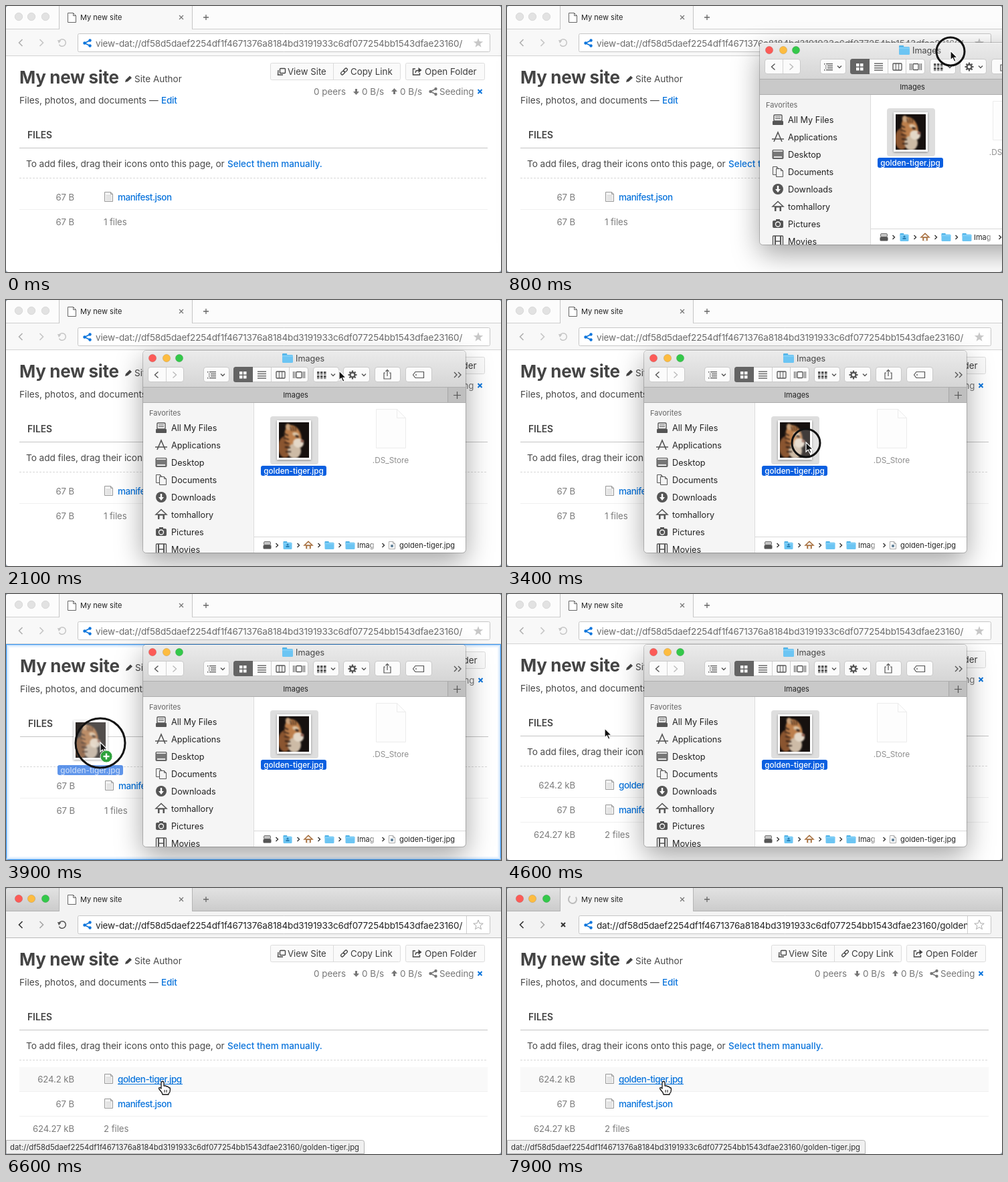
Write an HTML page with a canvas that moves like this. It is 740 by 398 pixels and loops after 8000 ms.

```html
<!DOCTYPE html>
<html lang="en">
<head>
<meta charset="utf-8">
<title>Adding a file to a site</title>
<style>
html, body { margin: 0; width: 740px; height: 398px; overflow: hidden; background: #fff; }
canvas { display: block; width: 740px; height: 398px; }
</style>
</head>
<body>
<canvas id="stage" width="740" height="398"></canvas>
<script>
const c = document.getElementById('stage').getContext('2d');
const LOOP = 8000, STEP = 100;
const HASH = 'df58d5daef2254df1f4671376a8184bd3191933c6df077254bb1543dfae23160';
const PHOTO = 'golden-tiger.jpg';
const BLUE = '#0a74dc', INK = '#484848';

// [time, x, y]
const windowPath = [[0, 778, 54], [200, 705, 54], [400, 605, 54], [600, 492, 54], [800, 378, 55],
  [900, 322, 64], [1000, 273, 70], [1200, 211, 76], [1500, 205, 76]];
const cursorPath = [[0, 1063, 67], [400, 890, 67], [800, 663, 67], [900, 614, 76], [1000, 570, 82],
  [1200, 515, 88], [1500, 509, 88], [1900, 508, 89], [2300, 488, 122], [2800, 452, 202], [3000, 447, 213],
  [3400, 447, 213], [3600, 248, 224], [3700, 185, 225], [3800, 148, 223], [3900, 141, 222],
  [4300, 141, 222], [4900, 150, 180], [5500, 150, 180], [6300, 222, 269], [6500, 234, 291]];
// [pressed, released]
const presses = [[0, 1600], [3300, 3800], [5100, 5300], [7300, 7400]];

function at(keys, t) {
  let i = 0;
  while (i < keys.length - 1 && keys[i + 1][0] <= t) i++;
  const a = keys[i], b = keys[i + 1];
  if (!b) return [a[1], a[2]];
  const p = (t - a[0]) / (b[0] - a[0]);
  return [Math.round(a[1] + (b[1] - a[1]) * p), Math.round(a[2] + (b[2] - a[2]) * p)];
}

function text(s, x, y, size, color, o = {}) {
  c.font = `${o.w || 400} ${size}px Inter, sans-serif`;
  c.letterSpacing = (o.ls || 0) + 'px';
  c.textAlign = o.align || 'left';
  c.fillStyle = color;
  c.fillText(s, x, y);
}

function rect(x, y, w, h, color) { c.fillStyle = color; c.fillRect(x, y, w, h); }

function box(x, y, w, h, r, fill, stroke, lw = 1) {
  c.beginPath();
  c.roundRect(x, y, w, h, r);
  paint(fill, stroke, lw);
}

function paint(fill, stroke, lw = 1) {
  if (fill) { c.fillStyle = fill; c.fill(); }
  if (stroke) { c.strokeStyle = stroke; c.lineWidth = lw; c.stroke(); }
}

function disc(x, y, r, fill, stroke, lw) {
  c.beginPath();
  c.arc(x, y, r, 0, Math.PI * 2);
  paint(fill, stroke, lw);
}

function oval(x, y, rx, ry, fill, turn = 0) {
  c.beginPath();
  c.ellipse(x, y, rx, ry, turn, 0, Math.PI * 2);
  paint(fill);
}

// points are a flat list: x, y, x, y, ...
function trace(p) {
  c.beginPath();
  for (let i = 0; i < p.length; i += 2) c.lineTo(p[i], p[i + 1]);
}
function line(p, color, lw = 1) { trace(p); paint(null, color, lw); }
function poly(p, fill, stroke, lw) { trace(p); c.closePath(); paint(fill, stroke, lw); }

function shift(x, y, draw) {
  c.save();
  c.translate(x, y);
  draw();
  c.restore();
}

function fade(y0, y1, a, b) {
  const g = c.createLinearGradient(0, y0, 0, y1);
  g.addColorStop(0, a);
  g.addColorStop(1, b);
  return g;
}

function chevron(x, y, w, h, color, lw) { line([x - w, y - h, x + w, y, x - w, y + h], color, lw); }
function drop(x, y, color) { line([x - 3, y - 1.5, x, y + 1.5, x + 3, y - 1.5], color, 1.4); }

function share(x, y, color) {
  line([x + 4, y - 4, x - 4, y, x + 4, y + 4], color, 1.6);
  disc(x + 4, y - 4, 2.2, color);
  disc(x - 4, y, 2.2, color);
  disc(x + 4, y + 4, 2.2, color);
}

function arrow(x, y, dir, color) {
  line([x, y - 4 * dir, x, y + 1 * dir], color, 3);
  poly([x - 4.5, y, x + 4.5, y, x, y + 5 * dir], color);
}

function star(x, y, r, fill, stroke) {
  const p = [];
  for (let i = 0; i < 10; i++) {
    const a = -Math.PI / 2 + i * Math.PI / 5, q = i % 2 ? r * 0.42 : r;
    p.push(x + Math.cos(a) * q, y + Math.sin(a) * q);
  }
  poly(p, fill, stroke, 1);
}

function sheet(x, y, w, h, fold, fill, stroke) {
  poly([x, y, x + w - fold, y, x + w, y + fold, x + w, y + h, x, y + h], fill, stroke);
  line([x + w - fold, y, x + w - fold, y + fold, x + w, y + fold], stroke);
}

function folder(x, y, w, h) {
  box(x, y, w * 0.45, h * 0.4, 1, '#4fb2e6');
  box(x, y + h * 0.14, w, h * 0.86, 1.5, '#6cc5f3');
  rect(x, y + h * 0.26, w, 1, '#8fd6fa');
}

function house(x, y, color, s = 1) {
  poly([x - 8 * s, y, x, y - 7.5 * s, x + 8 * s, y], null, color, 1.5);
  rect(x - 5 * s, y, 10 * s, 7 * s, color);
  rect(x - 2.5 * s, y + 1.5 * s, 5 * s, 5.5 * s, '#f5f5f5');
}

function lights(xs, y, on) {
  ['#fc5b57', '#fdbc40', '#34c84a'].forEach((col, i) =>
    disc(xs[i], y, 5.7, on ? col : '#e2e2e2', on ? 'rgba(0,0,0,.14)' : '#d3d3d3', 0.8));
}

function drawChrome(t, active, loading) {
  const ink = active ? '#333' : '#b0b0b0', pale = active ? '#a5a5a5' : '#c6c6c6';
  const bar = active ? '#f3f3f3' : '#f8f8f8';
  rect(0, 0, 740, 35, active ? fade(0, 35, '#e2e2e2', '#cbcbcb') : '#fcfcfc');
  rect(0, 34, 740, 1, active ? '#b0b0b0' : '#cfcfcf');
  rect(0, 35, 740, 39, bar);
  rect(79, 0, 200, 35, bar);
  line([79.5, 0, 79.5, 35], active ? '#b4b4b4' : '#c6c6c6');
  line([278.5, 0, 278.5, 35], active ? '#b4b4b4' : '#c6c6c6');
  rect(0, 74, 740, 1, active ? '#b9b9b9' : '#d4d4d4');
  lights([19, 38, 59], 16, active);

  if (loading) {
    const a = t / 1000 * Math.PI * 2;
    c.beginPath();
    c.arc(98, 17, 6, a, a + Math.PI * 1.5);
    paint(null, '#bdbdbd', 2);
  } else sheet(92.5, 10.5, 12, 14, 4, '#fff', '#666');
  text('My new site', 111, 21, 11, '#222');
  line([259, 14, 265, 20], '#777', 1.2);
  line([265, 14, 259, 20], '#777', 1.2);
  line([295, 17, 303, 17], '#666', 1.3);
  line([299, 13, 299, 21], '#666', 1.3);

  chevron(22, 55, -2.5, 5, ink, 1.6);
  chevron(53, 55, 2.5, 5, pale, 1.6);
  if (loading) {
    line([81, 52, 87, 58], ink, 2);
    line([87, 52, 81, 58], ink, 2);
  } else {
    const col = active ? '#555' : pale;
    c.beginPath();
    c.arc(84, 55, 5.3, -2.6, 2.6);
    paint(null, col, 1.5);
    poly([77, 51, 82.5, 51.5, 79, 56], col);
  }

  box(107.5, 41.5, 616, 27, 2, '#fff', '#c6c6c6');
  share(121.5, 55.5, BLUE);
  c.save();
  c.beginPath();
  c.rect(108, 42, 580, 26);
  c.clip();
  const url = loading ? `dat://${HASH}/${PHOTO}` : `view-dat://${HASH}/`;
  text(url, 134, 60.5, 13.5, active ? '#222' : '#6c6c6c', { ls: -0.15 });
  c.restore();
  if (active) line([688.5, 42, 688.5, 68], '#cfcfcf');
  star(706, 55.5, 7.6, active ? '#fff' : '#c8c8c8', active ? '#aaa' : null);
}

function button(x, w) { box(x + 0.5, 85.5, w, 25, 2, '#fafafa', '#dcdcdc'); }

function drawRow(y, size, name) {
  text(size, 102, y + 5, 13.2, '#7c7c7c', { align: 'right', ls: -0.1 });
  if (!name) return;
  sheet(147.5, y - 7.5, 12, 14, 3, '#f3f3f3', '#999');
  for (let i = 0; i < 4; i++) line([149.5, y - 2.5 + i * 2.2, 157.5, y - 2.5 + i * 2.2], '#c9c9c9', 0.8);
  text(name, 167, y + 5, 13.5, BLUE, { w: 500, ls: -0.48 });
}

function drawPage(added, over, hover, link) {
  const grey = '#777';
  text('My new site', 20, 116, 26, '#444', { w: 700, ls: -0.33 });
  poly([178, 114, 179, 110.5, 185, 104.5, 188, 107.5, 182, 113], '#444');
  text('Site Author', 192, 114, 13.5, INK);
  text('Files, photos, and documents —', 20, 146, 13.7, INK);
  text('Edit', 232, 146, 13.5, BLUE, { w: 500, ls: -0.2 });

  button(395, 194);
  line([489.5, 86, 489.5, 110], '#dcdcdc');
  button(597, 118);
  box(409.5, 93.5, 8, 7, 1, null, '#444', 1.4);
  line([407, 96, 406.5, 103, 414, 103], '#444', 1.4);
  text('View Site', 421, 103, 13.2, '#3c3c3c');
  c.save();
  c.translate(505.5, 98);
  c.rotate(-Math.PI / 4);
  box(-6, -2, 6.5, 4, 2, null, '#444', 1.3);
  box(-0.5, -2, 6.5, 4, 2, null, '#444', 1.3);
  c.restore();
  text('Copy Link', 515, 103, 13.3, '#3c3c3c');
  line([612, 94, 608.5, 94, 608.5, 103, 618.5, 103, 618.5, 100], '#444', 1.4);
  line([612, 100, 613, 97, 618, 96], '#444', 1.5);
  poly([616.5, 92, 621.5, 96, 616.5, 100], '#444');
  text('Open Folder', 626, 103, 13.4, '#3c3c3c');

  text('0 peers', 460, 133, 13.4, grey);
  arrow(523.5, 128, 1, grey);
  text('0 B/s', 532, 133, 13.5, grey);
  arrow(580.5, 128, -1, grey);
  text('0 B/s', 589, 133, 13.5, grey);
  share(638.5, 128, grey);
  text('Seeding', 648, 133, 13.3, grey);
  line([705.5, 125, 711.5, 131], BLUE, 2);
  line([711.5, 125, 705.5, 131], BLUE, 2);

  text('FILES', 32, 198, 13.8, '#444', { w: 600 });
  rect(20, 212, 700, 1, '#c4c4c4');
  if (!over) {
    text('To add files, drag their icons onto this page, or', 30, 241, 13.7, INK, { ls: -0.09 });
    text('Select them manually.', 331, 241, 13.5, BLUE, { w: 500 });
  }
  c.setLineDash([3, 2]);
  line([20, 257.5, 720, 257.5], '#d8d8d8');
  c.setLineDash([]);

  if (hover) rect(20, 268, 700, 36, '#f9f9f9');
  const files = added ? [['624.2 kB', PHOTO], ['67 B', 'manifest.json']] : [['67 B', 'manifest.json']];
  files.forEach(([size, name], i) => {
    drawRow(286 + i * 37, size, name);
    rect(20, 304 + i * 37, 700, 1, '#f0f0f0');
  });
  if (link) rect(167, 293, 97, 1, BLUE);
  const y = 286 + files.length * 37;
  drawRow(y, added ? '624.27 kB' : '67 B');
  text(files.length + ' files', 146, y + 5, 13.2, '#7c7c7c', { ls: -0.05 });
}

function drawDropBorder() {
  for (let i = 1; i < 5; i++) {
    c.strokeStyle = `rgba(30,135,240,${0.3 / i})`;
    c.lineWidth = 1;
    c.strokeRect(i + 0.5, 75.5 + i, 739 - i * 2, 322 - i * 2);
  }
  c.strokeStyle = '#3a97f2';
  c.strokeRect(0.5, 75.5, 739, 322);
}

function drawPhoto(x, y) {
  c.save();
  c.translate(x, y);
  c.shadowColor = 'rgba(0,0,0,.4)';
  c.shadowBlur = 3;
  c.shadowOffsetY = 1;
  rect(0, 0, 51, 59, '#fff');
  c.shadowColor = 'transparent';
  c.beginPath();
  c.rect(3, 3, 45, 53);
  c.clip();
  rect(3, 3, 45, 53, '#17110f');
  c.filter = 'blur(1.2px)';
  oval(12, 40, 10, 16, '#8a5530');
  oval(24, 24, 12, 17, '#bd7f4c', -0.3);
  oval(17, 10, 4, 5, '#c9a27c', -0.4);
  oval(26, 46, 10, 11, '#cdbba6');
  oval(32, 34, 8, 7, '#e4d8c8', 0.3);
  oval(28, 21, 5, 3, '#dcc4a6', 0.3);
  oval(30, 24, 3, 1.5, '#2a1a12', 0.3);
  oval(38, 31, 2.5, 2, '#8a5546');
  for (let i = 0; i < 5; i++) line([9 + i, 19 + i * 7, 17 + i, 23 + i * 6], '#2a1a12', 1.8);
  for (let i = 0; i < 3; i++) line([20 + i * 4, 9, 22 + i * 3, 16], '#3a2416', 1.4);
  c.restore();
}

function drawLabel(x, y) {
  box(x, y, 98, 15, 3, '#0b5fe0');
  text(PHOTO, x + 49, y + 12, 11.7, '#fff', { align: 'center', w: 500 });
}

const sideIcons = [
  () => { box(-6, -7, 12, 9, 1, null, '#555', 1.4); line([-4, -4, 4, -4], '#555'); line([-4, -1.5, 4, -1.5], '#555'); box(-8, 2, 16, 6, 1, '#555'); },
  () => { line([-6, 7, 0, -7, 6, 7], '#555', 1.6); line([-9, 3, 9, 3], '#555', 1.5); },
  () => { box(-8, -6.5, 16, 13, 1, '#777', '#555'); rect(-7, -6, 14, 2, '#ddd'); rect(-6, 3, 12, 2, '#e5e5e5'); },
  () => { sheet(-7.5, -7.5, 9, 12, 3, '#f5f5f5', '#555'); sheet(-2.5, -4.5, 10, 12, 3, '#f5f5f5', '#555'); },
  () => { disc(0, 0, 8, '#555'); line([0, -5, 0, 1], '#fff', 2.5); poly([-4, 0, 4, 0, 0, 5], '#fff'); },
  () => house(0, 0, '#555'),
  () => { box(-8, -5, 16, 11, 2, '#555'); rect(-3, -7, 6, 3, '#555'); disc(0, 0.5, 3.5, '#555', '#fff', 1.3); },
  () => { box(-7.5, -8, 15, 16, 1, null, '#555', 1.4); rect(-5, -8, 2, 16, '#555'); rect(3, -8, 2, 16, '#555'); line([-4, 0, 4, 0], '#555', 1.5); }
];
const sideNames = ['All My Files', 'Applications', 'Desktop', 'Documents', 'Downloads', 'tomhallory', 'Pictures', 'Movies'];

function tool(x, w) { box(x + 0.5, 24.5, w, 22, 3.5, '#fbfbfb', '#c9c9c9'); }

function drawToolbar() {
  const ink = '#555';
  tool(7, 53);
  line([34.5, 25, 34.5, 46], '#d2d2d2');
  chevron(20, 36, -2.5, 4.5, ink, 1.4);
  chevron(47, 36, 2.5, 4.5, '#bbb', 1.4);

  tool(90, 38);
  for (let i = 0; i < 4; i++) {
    const inset = i % 3 ? 2 : 0;
    rect(96 + inset, 31 + i * 3, 1.5, 1.5, ink);
    rect(99 + inset, 31 + i * 3, 10 - inset, 1.3, ink);
  }
  drop(119, 36, ink);

  tool(135, 111);
  box(135, 24, 29, 23, [3.5, 0, 0, 3.5], '#646464');
  for (let i = 0; i < 4; i++) rect(144 + (i % 2) * 6, 31 + (i >> 1) * 6, 4.5, 4.5, '#fff');
  for (let i = 0; i < 4; i++) rect(171, 30.5 + i * 3.3, 13, 1.3, ink);
  box(199, 31, 13, 10, 1, null, ink, 1.3);
  line([203.3, 31, 203.3, 41], ink);
  line([207.7, 31, 207.7, 41], ink);
  box(229, 31.5, 8, 9, 1, null, ink, 1.3);
  [224.5, 226.8, 239.3, 241.6].forEach(x => line([x, 31, x, 41], ink));
  [191.5, 218.5].forEach(x => line([x, 25, x, 46], '#d0d0d0'));

  tool(254, 38);
  for (let i = 0; i < 6; i++) {
    rect(260 + (i % 3) * 5, 31 + (i / 3 | 0) * 6, 3.5, 3.5, ink);
    rect(260 + (i % 3) * 5, 35.3 + (i / 3 | 0) * 6, 3.5, 0.8, ink);
  }
  drop(284, 36, ink);

  tool(299, 39);
  for (let i = 0; i < 8; i++) {
    const a = i * Math.PI / 4, x = Math.cos(a), y = Math.sin(a);
    line([313 + x * 3, 36 + y * 3, 313 + x * 6.5, 36 + y * 6.5], ink, 2.2);
  }
  disc(313, 36, 3.5, '#fbfbfb', ink, 2.4);
  drop(330, 36, ink);

  tool(346, 38);
  line([362, 33, 360, 33, 360, 42, 370, 42, 370, 33, 368, 33], ink, 1.2);
  line([365, 38, 365, 28.5], ink, 1.2);
  line([362.5, 31, 365, 28.5, 367.5, 31], ink, 1.2);

  tool(392, 39);
  poly([403.5, 36, 407, 31.5, 419.5, 31.5, 419.5, 40.5, 407, 40.5], null, ink, 1.2);
  disc(408, 36, 0.9, ink);
  chevron(467, 36, 2, 4, ink, 1.4);
  chevron(473, 36, 2, 4, ink, 1.4);
}

function drawPathBar() {
  rect(166, 278, 316, 1, '#d9d9d9');
  box(180.5, 285.5, 10, 5, 1.5, '#c4c4c4', '#777');
  box(179.5, 290.5, 12, 6, 1.5, '#555');
  [200, 232, 263, 294, 359].forEach(x => chevron(x, 291, 1.5, 3, '#333', 1.4));
  folder(209.5, 285, 13, 12);
  disc(216, 290, 1.6, '#2a80b5');
  rect(213.5, 292, 5, 2, '#2a80b5');
  house(247, 291, '#a8703f', 0.75);
  folder(271.5, 285, 14, 12);
  folder(302.5, 285, 14, 12);
  const g = c.createLinearGradient(336, 0, 348, 0);
  g.addColorStop(0, '#222');
  g.addColorStop(1, '#ccc');
  text('Imag', 320, 295, 11, g);
  sheet(367.5, 285.5, 9, 11, 3, '#fff', '#aaa');
  rect(370, 290, 4, 4, '#6d8aa0');
  text(PHOTO, 383, 295, 11, '#222');
}

function drawFiles() {
  c.save();
  c.shadowColor = 'rgba(0,0,0,.36)';
  c.shadowBlur = 40;
  c.shadowOffsetY = 14;
  box(0, 0, 482, 302, 5, '#fff');
  c.restore();
  box(-0.5, -0.5, 483, 303, 5, null, 'rgba(0,0,0,.2)');
  c.save();
  c.beginPath();
  c.roundRect(0, 0, 482, 302, 5);
  c.clip();

  rect(0, 0, 482, 55, fade(0, 55, '#ebebeb', '#d5d5d5'));
  rect(0, 0, 482, 1, '#f6f6f6');
  lights([14, 35, 54], 11, true);
  folder(208, 4, 16, 14);
  text('Images', 228, 16, 12.6, '#444');
  drawToolbar();
  rect(0, 54, 482, 24, '#c9c9c9');
  rect(0, 54, 482, 1, '#adadad');
  rect(0, 77, 482, 1, '#adadad');
  rect(455, 55, 1, 22, '#a8a8a8');
  rect(456, 55, 26, 22, '#bfbfbf');
  text('Images', 228, 70, 11, '#222', { align: 'center' });
  line([464, 66.5, 475, 66.5], '#555', 1.2);
  line([469.5, 61, 469.5, 72], '#555', 1.2);

  rect(0, 78, 166, 224, '#f5f5f5');
  rect(165, 78, 1, 224, '#dcdcdc');
  text('Favorites', 9, 97, 11, '#666');
  sideNames.forEach((name, i) => {
    const y = 115 + i * 26;
    shift(27, y, sideIcons[i]);
    text(name, 42, y + 4.5, 12.7, '#222');
  });

  box(190, 98, 72, 72, 4, '#dedede');
  drawPhoto(200, 104);
  drawLabel(176, 172);
  sheet(348.5, 87.5, 44, 58, 13, '#fdfdfd', '#ececec');
  text('.DS_Store', 370, 168, 11.8, '#8e8e8e', { align: 'center' });
  drawPathBar();
  c.restore();
}

function drawGhost(x, y) {
  c.save();
  c.globalAlpha = 0.9;
  drawPhoto(x - 40, y - 33);
  c.globalAlpha = 0.65;
  drawLabel(x - 64, y + 34);
  c.restore();
}

function drawRing(x, y, t) {
  const p = presses.find(([down, up]) => t >= down && t < up + 200);
  if (!p) return;
  const r = t < p[1] ? 21 : t < p[1] + 100 ? 30 : 37;
  disc(x, y + 1, r, 'rgba(255,255,255,.18)', '#111', 3);
}

function drawCursor(x, y, hand) {
  shift(x, y, () => {
    if (hand) {
      trace([-2, 0, -1, -1.5, 1, -1.5, 2, 0, 2, 5, 5, 5, 6, 6, 8, 6, 9, 7.5, 11, 8, 11.5, 10, 11, 14, 9, 17,
        9, 18, 0, 18, -1, 15, -5, 10, -5.5, 8, -4, 7.5, -2, 9]);
      c.closePath();
      c.lineJoin = 'round';
      paint('#fff', '#111', 1.3);
      [3, 6].forEach(k => line([k, 11, k, 15], '#111'));
    } else {
      poly([0, 0, 0, 14, 3.2, 11, 5.6, 16.2, 8, 15.2, 5.7, 10.2, 10, 10], '#111', '#fff', 1.2);
    }
  });
}

function drawStatus() {
  box(0.5, 377.5, 535, 20, [0, 3, 0, 0], '#f0f0f0', '#b5b5b5');
  text(`dat://${HASH}/${PHOTO}`, 6, 391.5, 11.28, '#333');
}

function draw(t) {
  const active = t >= 5300, loading = t >= 7500;
  const over = t >= 3700 && t < 4000, link = t >= 6400;
  const [x, y] = at(cursorPath, t);

  rect(0, 0, 740, 398, '#8c9bab');
  c.save();
  c.beginPath();
  c.roundRect(0, 0, 740, 398, 4);
  c.clip();
  rect(0, 0, 740, 398, '#fff');
  drawChrome(t, active, loading);
  shift(over ? 1 : 0, over ? 1 : 0, () => drawPage(t >= 4000, over, t >= 6300, link));
  if (over) drawDropBorder();
  if (link) drawStatus();
  c.restore();

  if (t < 5200) shift(...at(windowPath, t), drawFiles);
  const dragging = t >= 3500 && t < 4000;
  if (dragging) drawGhost(x, y);
  drawRing(x, y, t);
  drawCursor(x, y, link);
  if (over) {
    disc(x + 9, y + 21, 9, '#2fa13c', '#e8f5e8', 1);
    line([x + 4.5, y + 21, x + 13.5, y + 21], '#fff', 2.4);
    line([x + 9, y + 16.5, x + 9, y + 25.5], '#fff', 2.4);
  }
}

const start = performance.now();
function tick() {
  const t = (performance.now() - start) % LOOP;
  draw(Math.floor(t / STEP) * STEP);
  requestAnimationFrame(tick);
}
tick();
</script>
</body>
</html>
```
